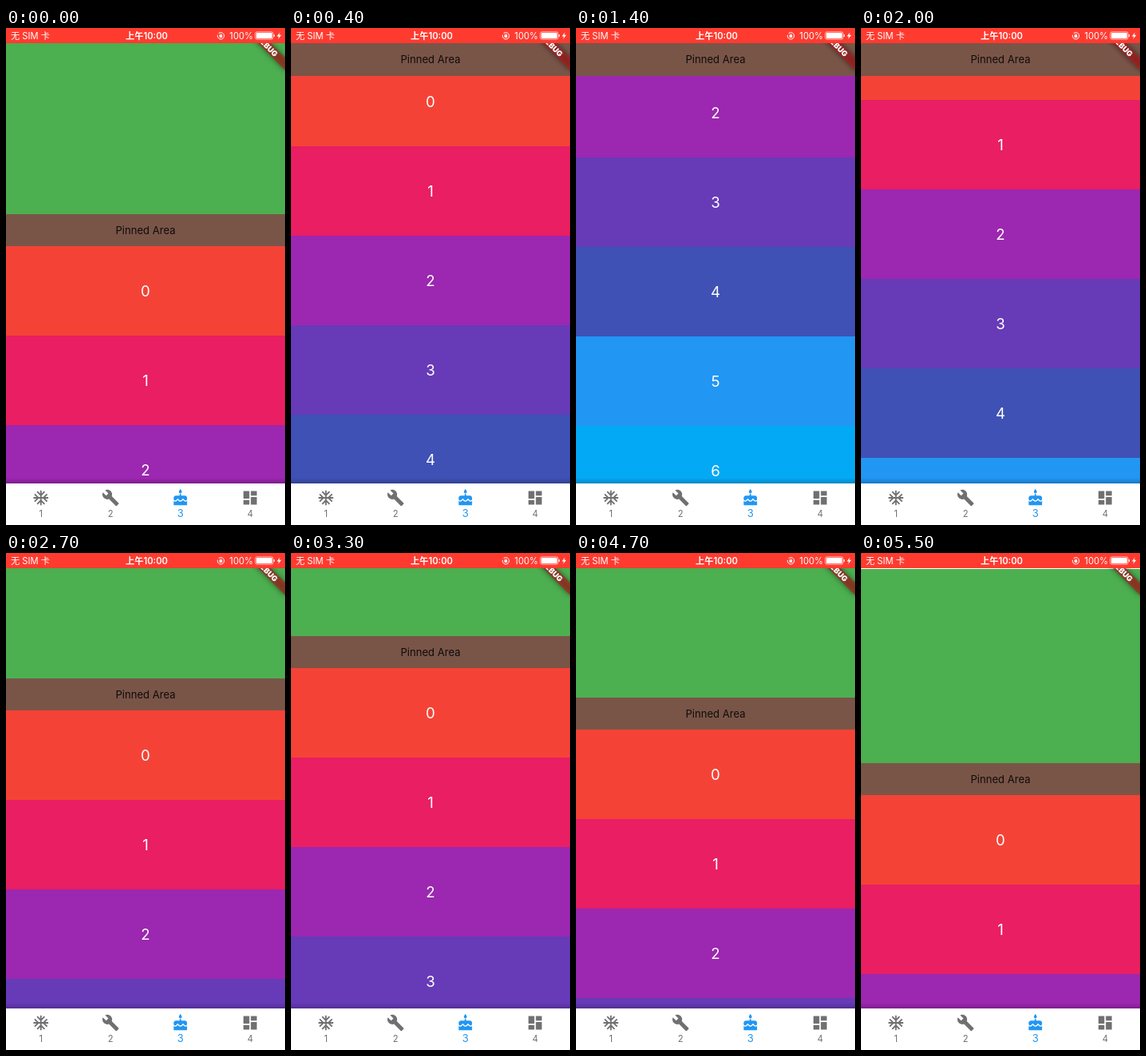
Recreate the animation shown at these times as an HTML page with a canvas. Size 350 px wide and 622 px high, loop 5.6 s.

```html
<!DOCTYPE html>
<html lang="zh">
<head>
<meta charset="utf-8">
<title>Pinned header scroll</title>
<style>
  html, body { margin: 0; width: 100%; height: 100%; overflow: hidden; background: #fff; }
  canvas { display: block; width: 350px; height: 622px; }
</style>
</head>
<body>
<canvas id="stage" width="350" height="622"></canvas>
<script>
const ctx = document.getElementById('stage').getContext('2d');
const W = 350, H = 622, LOOP = 5600, STEP = 100;
const SCALE = W / 375;
const STATUS_H = 19, PIN_H = 40, ITEM_H = 112, NAV_Y = 570, REST_Y = 302;
const FONT = 'Inter, "Noto Sans CJK SC", "Noto Sans CJK", sans-serif';
const BLUE = '#2196f3', GREY = '#707070';
const ITEM_COLORS = ['#f44336', '#e91e63', '#9c27b0', '#673ab7', '#3f51b5',
  '#2196f3', '#03a9f4', '#00bcd4', '#009688'];

// Top edge of item 0 over time: [ms, y]
const KEYS = [[0, 273], [800, -135], [1250, -185], [2000, -22], [2700, 197],
  [3020, 245], [3900, -212], [4000, -220], [4700, 221], [5500, 303]];

function slopeBetween(i) {
  return (KEYS[i + 1][1] - KEYS[i][1]) / (KEYS[i + 1][0] - KEYS[i][0]);
}

// Harmonic mean of neighbouring slopes: smooth, no overshoot
function tangent(i) {
  if (i === 0) return slopeBetween(0);
  if (i === KEYS.length - 1) return 0;
  const a = slopeBetween(i - 1), b = slopeBetween(i);
  return a * b <= 0 ? 0 : 2 * a * b / (a + b);
}

function scrollY(t) {
  let i = 0;
  while (i < KEYS.length - 2 && t > KEYS[i + 1][0]) i++;
  const [t0, y0] = KEYS[i], [t1, y1] = KEYS[i + 1];
  const d = t1 - t0, u = Math.min(1, (t - t0) / d), v = 1 - u;
  return y0 * (1 + 2 * u) * v * v + y1 * u * u * (3 - 2 * u)
    + d * u * v * (tangent(i) * v - tangent(i + 1) * u);
}

function rect(x, y, w, h, color) {
  ctx.fillStyle = color;
  ctx.fillRect(x, y, w, h);
}

function text(str, x, y, size, color, weight = 400, align = 'center') {
  ctx.font = `${weight} ${size}px ${FONT}`;
  ctx.textAlign = align;
  ctx.textBaseline = 'alphabetic';
  ctx.fillStyle = color;
  ctx.fillText(str, x, y);
}

function drawScroll(y) {
  const greenTop = STATUS_H + Math.max(0, y - REST_Y);
  const pinTop = Math.max(STATUS_H, y - PIN_H);
  const pinEnd = Math.max(STATUS_H + PIN_H + 1, y);

  ITEM_COLORS.forEach((color, i) => {
    const top = y + i * ITEM_H;
    if (top > NAV_Y || top + ITEM_H < 0) return;
    rect(0, top, W, ITEM_H, color);
    text(String(i), W / 2, top + ITEM_H / 2 + 6.7, 20 * SCALE, '#fff');
  });
  if (pinTop > greenTop) rect(0, greenTop, W, pinTop - greenTop, '#4caf50');
  rect(0, pinTop, W, pinEnd - pinTop, '#795548');
  text('Pinned Area', W / 2, pinTop + 24.6, 14 * SCALE, 'rgba(0,0,0,.87)');
}

function drawBanner() {
  const far = 1000;
  ctx.save();
  ctx.shadowColor = 'rgba(0,0,0,.5)';
  ctx.shadowBlur = 7.4;
  ctx.shadowOffsetX = far;
  ctx.translate(W - far, 0);
  ctx.rotate(Math.PI / 4);
  ctx.scale(SCALE, SCALE);
  rect(-40, 28, 80, 12, '#000');
  ctx.restore();

  ctx.save();
  ctx.translate(W, 0);
  ctx.rotate(Math.PI / 4);
  ctx.scale(SCALE, SCALE);
  rect(-40, 28, 80, 12, 'rgba(183,28,28,.627)');
  text('DEBUG', 0, 37.7, 10.2, '#fff', 900);
  ctx.restore();
}

const BOLT = new Path2D('M343.6 5.5L339.8 10.4H342.3L341.2 14L345.4 8.8H342.8Z');

function drawStatus() {
  rect(0, 0, W, STATUS_H, '#ff3b30');
  text('无 SIM 卡', 6, 13.8, 11.2, '#fff', 400, 'left');
  text('上午10:00', 176.5, 13.8, 11.2, '#fff', 600);
  text('100%', 310, 13.8, 11.2, '#fff', 400, 'right');

  // Rotation lock
  ctx.strokeStyle = '#fff';
  ctx.lineWidth = 1;
  ctx.beginPath();
  ctx.arc(269.5, 9.8, 4.2, -2.3, 3.4);
  ctx.stroke();
  ctx.beginPath();
  ctx.arc(269.5, 9, 1.2, Math.PI, 0);
  ctx.stroke();
  rect(267.7, 9, 3.6, 2.9, '#fff');

  // Battery
  ctx.lineWidth = .7;
  ctx.beginPath();
  ctx.roundRect(312.8, 4.9, 22.2, 9.2, 2);
  ctx.stroke();
  ctx.fillStyle = '#fff';
  ctx.beginPath();
  ctx.roundRect(314, 6, 19.8, 7, 1);
  ctx.roundRect(335.8, 8, 1.2, 3, .6);
  ctx.fill();
  ctx.fill(BOLT);
}

const FLAKE_ARM = new Path2D('M12 12V2M7.05 3.64L12 8.6L16.95 3.64');
const WRENCH = new Path2D('M22.7 19l-9.1-9.1c.9-2.3.4-5-1.5-6.9-2-2-5-2.4-7.4-1.3L9 6 6 9 1.6 4.7C.4 7.1.9 10.1 2.9 12.1c1.9 1.9 4.6 2.4 6.9 1.5l9.1 9.1c.4.4 1 .4 1.4 0l2.3-2.3c.5-.4.5-1.1.1-1.4z');
const CAKE = new Path2D('M12 6c1.11 0 2-.9 2-2 0-.38-.1-.73-.29-1.03L12 0l-1.71 2.97c-.19.3-.29.65-.29 1.03 0 1.1.9 2 2 2zm4.6 9.99l-1.07-1.07-1.08 1.07c-1.3 1.3-3.58 1.31-4.89 0l-1.07-1.07-1.09 1.07C6.75 16.64 5.88 17 4.96 17c-.73 0-1.4-.23-1.96-.61V21c0 .55.45 1 1 1h16c.55 0 1-.45 1-1v-4.61c-.56.38-1.23.61-1.96.61-.92 0-1.79-.36-2.44-1.01zM18 9h-5V7h-2v2H6c-1.66 0-3 1.34-3 3v1.54c0 1.08.88 1.96 1.96 1.96.52 0 1.02-.2 1.38-.57l2.14-2.13 2.13 2.13c.74.74 2.03.74 2.77 0l2.14-2.13 2.13 2.13c.37.37.86.57 1.38.57 1.08 0 1.96-.88 1.96-1.96V12C21 10.34 19.66 9 18 9z');
const TILES = new Path2D('M3 13h8V3H3zM3 21h8v-6H3zM13 21h8V11h-8zM13 3v6h8V3z');

function snowflake() {
  ctx.lineWidth = 2;
  for (let i = 0; i < 4; i++) {
    ctx.stroke(FLAKE_ARM);
    ctx.translate(12, 12);
    ctx.rotate(Math.PI / 2);
    ctx.translate(-12, -12);
  }
}

const TABS = [snowflake, () => ctx.fill(WRENCH), () => ctx.fill(CAKE), () => ctx.fill(TILES)];

function drawNav() {
  const shade = ctx.createLinearGradient(0, NAV_Y - 7, 0, NAV_Y);
  shade.addColorStop(0, 'rgba(0,0,0,0)');
  shade.addColorStop(1, 'rgba(0,0,0,.2)');
  rect(0, NAV_Y - 7, W, 7, shade);
  rect(0, NAV_Y, W, H - NAV_Y, '#fff');

  TABS.forEach((icon, i) => {
    const x = (i + .5) * W / 4, active = i === 2;
    const color = active ? BLUE : GREY;
    ctx.save();
    ctx.translate(x, 588);
    ctx.scale(SCALE, SCALE);
    ctx.translate(-12, -12);
    ctx.fillStyle = ctx.strokeStyle = color;
    icon();
    ctx.restore();
    text(String(i + 1), x, active ? 611.6 : 612, (active ? 14 : 12) * SCALE, color);
  });
}

function draw(now) {
  const t = Math.floor((now % LOOP) / STEP) * STEP;
  rect(0, 0, W, H, '#fff');
  drawScroll(Math.round(scrollY(t)));
  drawNav();
  drawBanner();
  drawStatus();
}

const start = performance.now();
function tick() {
  draw(performance.now() - start);
  requestAnimationFrame(tick);
}
tick();
</script>
</body>
</html>
```
